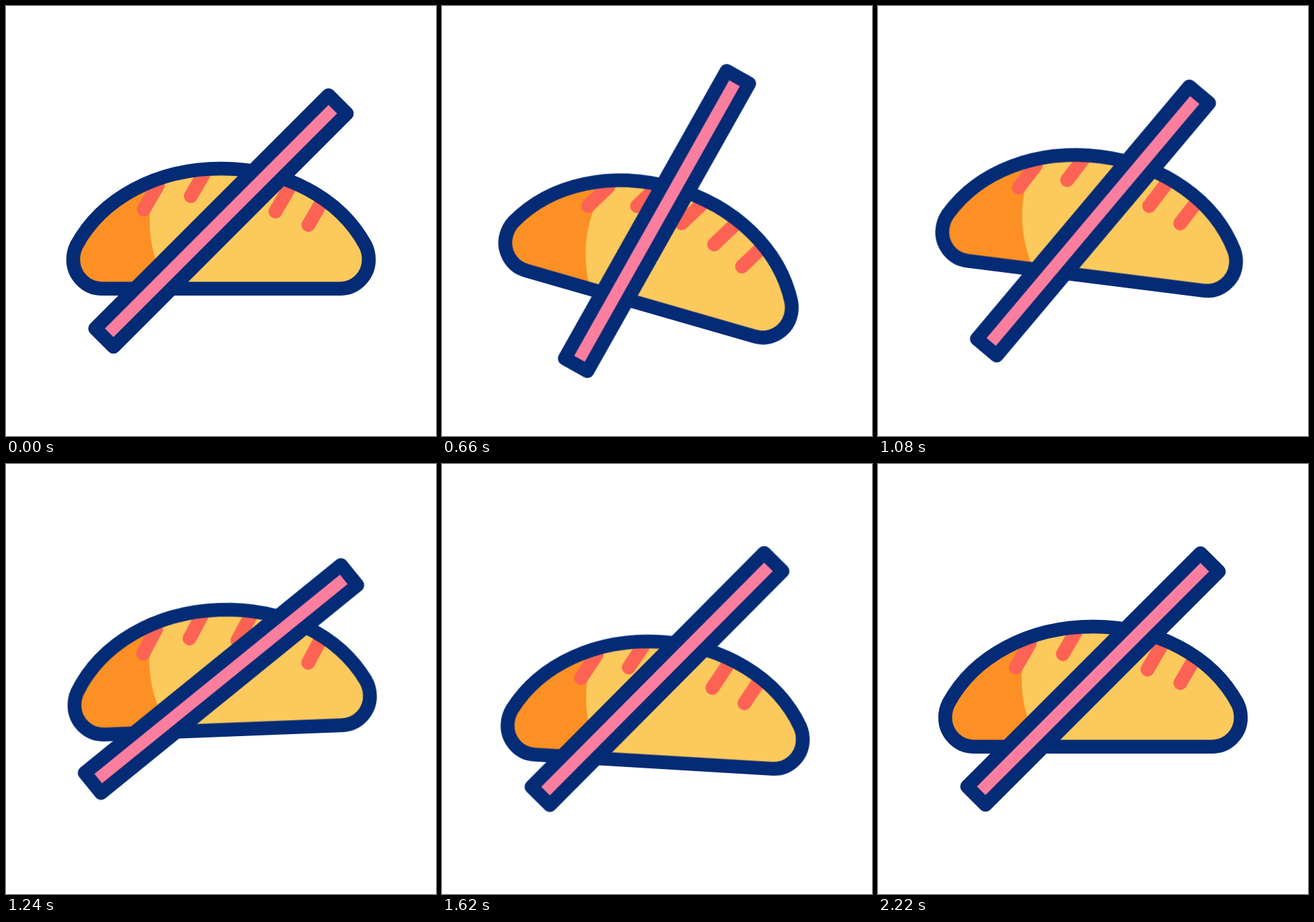
An HTML page without scripts for the animation above (2400 ms loop, 640 px wide and 640 px high).

```html
<!DOCTYPE html>
<html lang="en">
<head>
<meta charset="utf-8">
<title>Bread and stick</title>
<style>
  html, body { margin: 0; width: 100%; height: 100%; overflow: hidden; background: #fff; }
  svg { display: block; width: 100%; height: 100%; }

  .outline { stroke: #042b76; stroke-width: 20.6; stroke-linejoin: round; }
  .cuts { fill: none; stroke: #fc6354; stroke-width: 20.5; stroke-linecap: round; }

  .bob, .tilt, .stick {
    animation: 2400ms cubic-bezier(.333, 0, .667, 1) infinite;
  }
  .bob { animation-name: bob; }
  .tilt { animation-name: tilt; transform-origin: 320px 331.5px; }
  .stick { animation-name: swing; transform-origin: 320px 320px; }

  @keyframes bob {
    0%, 8.333% { transform: translateY(0); }
    29.167%, 70.833% { transform: translateY(26px); }
    50% { transform: translateY(-26px); }
    91.667%, 100% { transform: translateY(0); }
  }
  @keyframes tilt {
    0%, 8.333% { transform: rotate(0deg); }
    33.333% { transform: rotate(18.6deg); }
    58.333% { transform: rotate(-6.6deg); }
    75% { transform: rotate(10.7deg); }
    91.667%, 100% { transform: rotate(0deg); }
  }
  @keyframes swing {
    0%, 8.333% { transform: rotate(0deg); }
    33.333% { transform: rotate(-18.1deg); }
    58.333% { transform: rotate(11deg); }
    75% { transform: rotate(-8.3deg); }
    91.667%, 100% { transform: rotate(0deg); }
  }
</style>
</head>
<body>
<svg viewBox="0 0 640 640">
  <defs>
    <path id="loaf" d="M143 420.7C119 420.7 100 401 100 377.5C100 369 102 362 105 356
      C143 286 225 242 320 242S497 286 535 356C538 362 540 369 540 377.5
      C540 401 521 420.7 497 420.7Z"/>
    <clipPath id="inside"><use href="#loaf"/></clipPath>
  </defs>

  <g class="bob">
    <g class="tilt">
      <use href="#loaf" fill="#fcc95c"/>
      <g clip-path="url(#inside)">
        <path fill="#fc9024" d="M90 230H235L224 262C207 310 211 365 239 415V430H90Z"/>
        <path class="cuts" d="M205 303l21-36M275 283l21-36M346 289l21-36M401 306l21-36M450 326l21-36"/>
      </g>
      <use href="#loaf" class="outline" fill="none"/>
    </g>
  </g>

  <path class="stick outline" fill="#fc7e9f" d="M132.7 480L480 132.7L507.3 160L160 507.3Z"/>
</svg>
</body>
</html>
```
